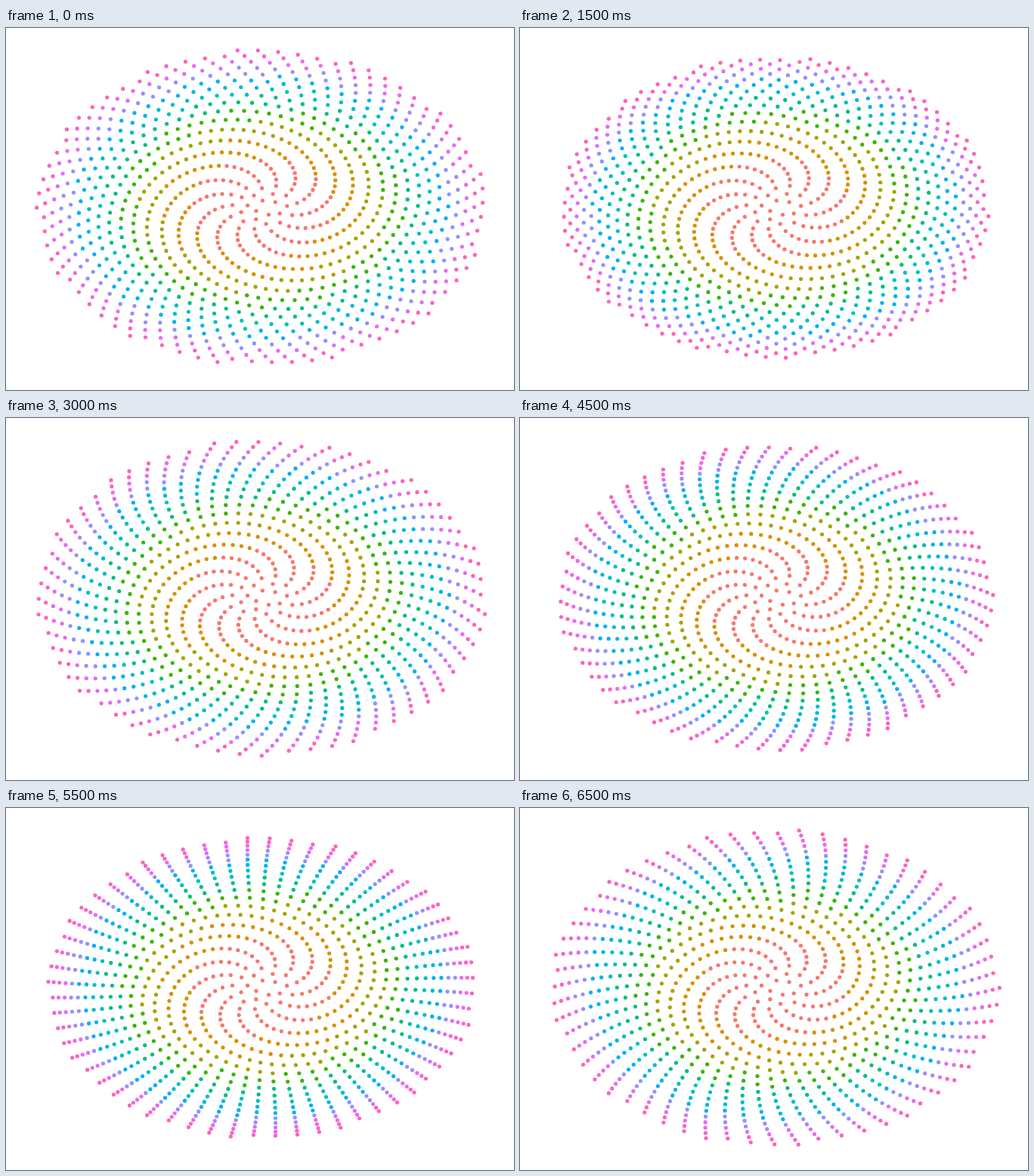
Write an HTML page with a canvas that moves like this. It is 672 px wide and 480 px high and loops after 8000 ms.

```html
<!DOCTYPE html>
<html lang="en">
<head>
<meta charset="utf-8">
<title>Phyllotaxis</title>
<style>
  html, body { margin: 0; width: 100%; height: 100%; overflow: hidden; background: #fff; }
  canvas { display: block; width: 672px; height: 480px; }
</style>
</head>
<body>
<canvas id="stage" width="672" height="480"></canvas>
<script>
const ctx = document.getElementById('stage').getContext('2d');

const COUNT = 1000;
const DOT_RADIUS = 2.6;
const ORIGIN = { x: 337.94, y: 238.18 };
const SCALE = { x: 9.4, y: 6.639 };
const COLORS = ['#F8766D', '#D89000', '#A3A500', '#39B600', '#00BF7D',
                '#00BFC4', '#00B0F6', '#9590FF', '#E76BF3', '#FF62BC'];

// Turns between successive dots, one value per resting pose.
const TURNS = [0.6165, 0.6166, 0.6167];

// Pose shown in each 500 ms step; fractions lie between two resting poses.
const STEP_MS = 500;
const STEPS = [0, 0, 0.2, 0.4, 0.6, 0.8, 1, 1, 1, 1.2, 1.4, 1.6, 1.8, 2, 2, 2];

function place(n, turn) {
  const angle = 2 * Math.PI * n * turn;
  const radius = Math.sqrt(n);
  return { x: radius * Math.cos(angle), y: radius * Math.sin(angle) };
}

const mix = (a, b, k) => a + (b - a) * k;

function draw(pose) {
  const from = Math.floor(pose);
  const to = Math.min(from + 1, TURNS.length - 1);
  const k = pose - from;
  ctx.fillStyle = '#fff';
  ctx.fillRect(0, 0, 672, 480);
  for (let n = 1; n <= COUNT; n++) {
    const a = place(n, TURNS[from]);
    const b = place(n, TURNS[to]);
    ctx.fillStyle = COLORS[Math.floor((n - 1) * COLORS.length / COUNT)];
    ctx.beginPath();
    ctx.arc(ORIGIN.x + SCALE.x * mix(a.x, b.x, k),
            ORIGIN.y - SCALE.y * mix(a.y, b.y, k),
            DOT_RADIUS, 0, 2 * Math.PI);
    ctx.fill();
  }
}

const start = performance.now();
let shown = -1;

function tick() {
  const elapsed = performance.now() - start;
  const step = Math.floor(elapsed / STEP_MS) % STEPS.length;
  if (step !== shown) {
    draw(STEPS[step]);
    shown = step;
  }
  requestAnimationFrame(tick);
}
tick();
</script>
</body>
</html>
```
